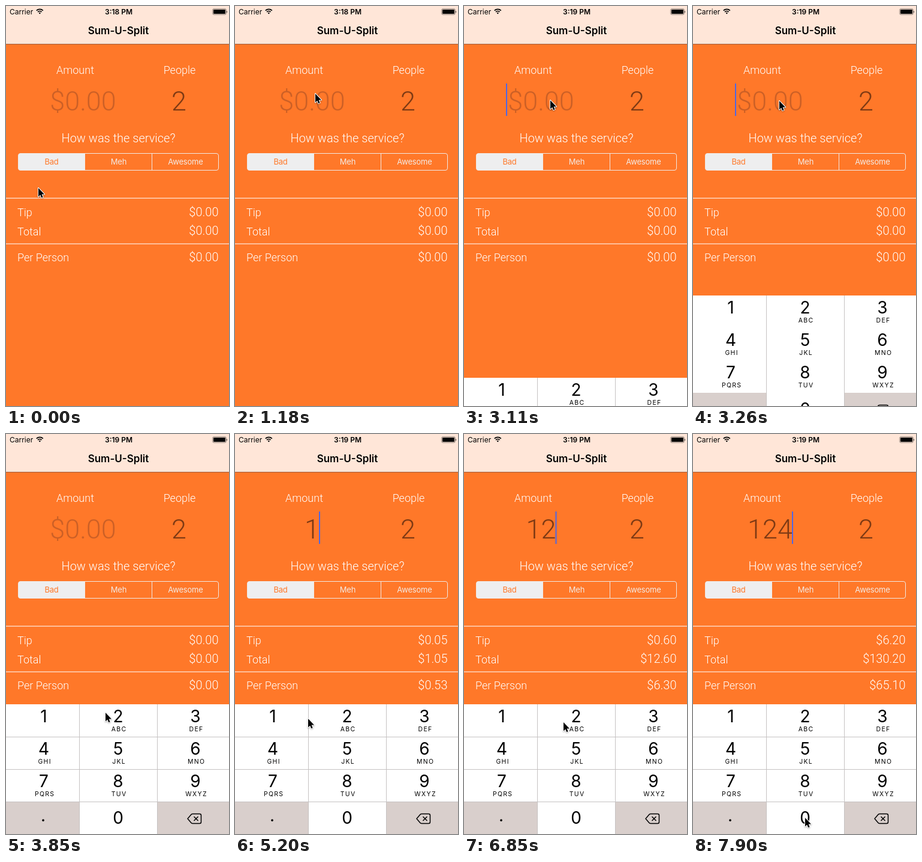
An HTML page that plays this animation: 372x666 px, repeating every 8 s.

```html
<!DOCTYPE html>
<html lang="en">
<head>
<meta charset="utf-8">
<title>Tip calculator</title>
<style>
  html, body { margin: 0; width: 100%; height: 100%; overflow: hidden; background: #ff7829; }
  svg { display: block; width: 372px; height: 666px; font-family: Inter, sans-serif; }
  .thin { font-family: Roboto, "Liberation Sans", sans-serif; font-weight: 300; fill: #fff; }
  .mid { text-anchor: middle; }
  .end { text-anchor: end; font-size: 20px; }
  .label { font-size: 18px; }
  .big { font-size: 45px; fill: #7e3a14; }
  .hint { fill: #cc6026; }
  .seg { font-size: 13px; letter-spacing: -.2px; fill: #f3ebe6; }
  .digit { font-size: 28px; }
  .abc { font-size: 10.5px; letter-spacing: 1.3px; }
  #cursor { paint-order: stroke; filter: drop-shadow(0 1px 1px rgba(0, 0, 0, .3)); }
</style>
</head>
<body>
<svg viewBox="0 0 372 666">
  <rect width="372" height="666" fill="#ff7829"/>

  <rect width="372" height="63" fill="#ffe6d8"/>
  <rect y="63" width="372" height="1" fill="#9c5c3c"/>
  <text x="6" y="13.5" font-size="12">Carrier</text>
  <g fill="none" stroke="#000" stroke-width="1.7">
    <path d="M50.8 7.6a7.9 7.9 0 0 1 11 0M53 9.9a4.8 4.8 0 0 1 6.6 0"/>
    <path d="M56.3 13.4l-1.7-1.8a2.5 2.5 0 0 1 3.4 0z" fill="#000" stroke="none"/>
  </g>
  <text id="clock" x="165" y="13.5" font-size="12" font-weight="600"></text>
  <rect x="344.75" y="4.75" width="22.5" height="9.5" rx="2" fill="none" stroke="#000" stroke-width=".5"/>
  <rect x="346" y="6" width="20" height="7" rx="1"/>
  <path d="M368 7.5q1.5 2 0 4z"/>
  <text class="mid" x="187.5" y="47" font-size="17" font-weight="600">Sum-U-Split</text>

  <g class="thin">
    <g class="label">
      <text class="mid" x="115.5" y="113">Amount</text>
      <text class="mid" x="289.5" y="113">People</text>
      <text x="19" y="350">Tip</text>
      <text x="19" y="382">Total</text>
      <text x="19" y="425">Per Person</text>
    </g>
    <text id="amount" class="big mid" x="128.5" y="174"></text>
    <text class="big mid" x="288.5" y="174">2</text>
    <text class="mid" x="187.5" y="227" font-size="20">How was the service?</text>
    <text id="tip" class="end" x="354.5" y="350"></text>
    <text id="total" class="end" x="354.5" y="381"></text>
    <text id="each" class="end" x="354.5" y="425"></text>
  </g>
  <rect id="caret" y="129" width="2" height="54" fill="#4b66e8"/>

  <path d="M24 245.5H131.5V273.5H24a3.5 3.5 0 0 1-3.5-3.5V249a3.5 3.5 0 0 1 3.5-3.5z" fill="#eeeeef"/>
  <rect x="20.5" y="245.5" width="334" height="28" rx="3.5" fill="none" stroke="#f1e9e4"/>
  <path d="M131.5 245V274M243.5 245V274" stroke="#f1e9e4"/>
  <g class="seg mid">
    <text x="76" y="264" style="fill:#ff7829">Bad</text>
    <text x="188" y="264">Meh</text>
    <text x="299.5" y="264">Awesome</text>
  </g>
  <path d="M0 320H372M0 396H372" stroke="#fff" stroke-width="2" opacity=".52"/>

  <g id="pad">
    <rect width="372" height="216" fill="#fff"/>
    <rect id="press" width="122" height="54" fill="#d9cfcc"/>
    <path d="M0 162H122V216H0zM253 162H372V216H253z" fill="#d9cfcc"/>
    <path d="M122.5 0V216M252.5 0V216" stroke="#c6c2c2"/>
    <path id="rows" d="M0 54.5H372M0 108.5H372M0 162.5H372" stroke="#c6c2c2"/>
    <g id="keys" class="mid"></g>
    <g fill="none" stroke="#000" stroke-width="1.5" stroke-linejoin="round">
      <path d="M303 190.5l6-7q1-1 2.5-1H323q2.5 0 2.5 2.5V196q0 2.5-2.5 2.5H311.5q-1.5 0-2.5-1z"/>
      <path d="M313.5 187l7 7M320.5 187l-7 7"/>
    </g>
  </g>

  <path id="cursor" d="M0 0V14.500L3.200 11.500 5.300 16.200 7.600 15.200 5.600 10.500H10z" stroke="#fff" stroke-width="2" stroke-linejoin="round"/>
</svg>
<script>
const LOOP = 8000, TICK = 148, TRAVEL = 600;
const $ = id => document.getElementById(id);

// Pointer stops: arrival time, x, y
const stops = [
  [0, 54, 303], [880, 134, 146], [2060, 144, 157], [3840, 166, 464],
  [4140, 92, 583], [4590, 64, 474], [5170, 122, 474], [5650, 198, 528],
  [6200, 189, 468], [7240, 69, 532], [7840, 187, 639]
];

// Typed amount over time; each entry restarts the caret
const entries = [[3100, 0], [4730, 1], [6500, 12], [7400, 124]];

const label = (cls, x, y, s) => `<text class="${cls}" x="${x}" y="${y}">${s}</text>`;
const letters = ["", "ABC", "DEF", "GHI", "JKL", "MNO", "PQRS", "TUV", "WXYZ"];
$("keys").innerHTML = letters.map((abc, i) => {
  const x = 63 + 126.5 * (i % 3) - (i % 3 === 1 ? 2.5 : 0), y = Math.floor(i / 3) * 54;
  return label("digit", x, y + 29.5, i + 1) + label("abc", x + 1.6, y + 45, abc);
}).join("") + label("digit", 62, 195, ".") + label("digit", 187, 199, "0");

const money = n => "$" + n.toFixed(2);
const show = (id, on) => $(id).setAttribute("visibility", on ? "visible" : "hidden");
const move = (id, x, y) => $(id).setAttribute("transform", `translate(${x} ${y})`);

function pointer(t) {
  let [last, x, y] = stops[0];
  for (const [arrive, toX, toY] of stops.slice(1)) {
    const span = Math.min(TRAVEL, arrive - last);
    const p = Math.min(1, Math.max(0, 1 - (arrive - t) / span));
    const ease = p * p * (3 - 2 * p);
    x += (toX - x) * ease;
    y += (toY - y) * ease;
    last = arrive;
  }
  return [Math.round(x), Math.round(y)];
}

function draw(time) {
  const t = Math.floor(time / TICK) * TICK;
  const [since, bill] = entries.filter(e => e[0] <= t).pop() || [Infinity, 0];

  $("clock").textContent = t < 2000 ? "3:18 PM" : "3:19 PM";
  $("amount").textContent = bill || "$0.00";
  $("amount").classList.toggle("hint", !bill);
  $("tip").textContent = money(bill * .05);
  $("total").textContent = money(bill * 1.05);
  $("each").textContent = money(bill * 1.05 / 2);

  show("caret", t >= since && (t - since) % 1000 < 550);
  $("caret").setAttribute("x", bill ? 127.5 + 12.5 * String(bill).length : 70);

  // Critically damped slide of the number pad
  const s = 16.9 * Math.max(0, t - 3056) / 1000;
  move("pad", 0, 450 + Math.round(216 * (1 + s) * Math.exp(-s)));
  show("rows", t > 3500);
  show("press", t > 4550 && t < 4850);
  move("cursor", ...pointer(t));
}

function loop() {
  draw(performance.now() % LOOP);
  requestAnimationFrame(loop);
}
loop();
</script>
</body>
</html>
```
